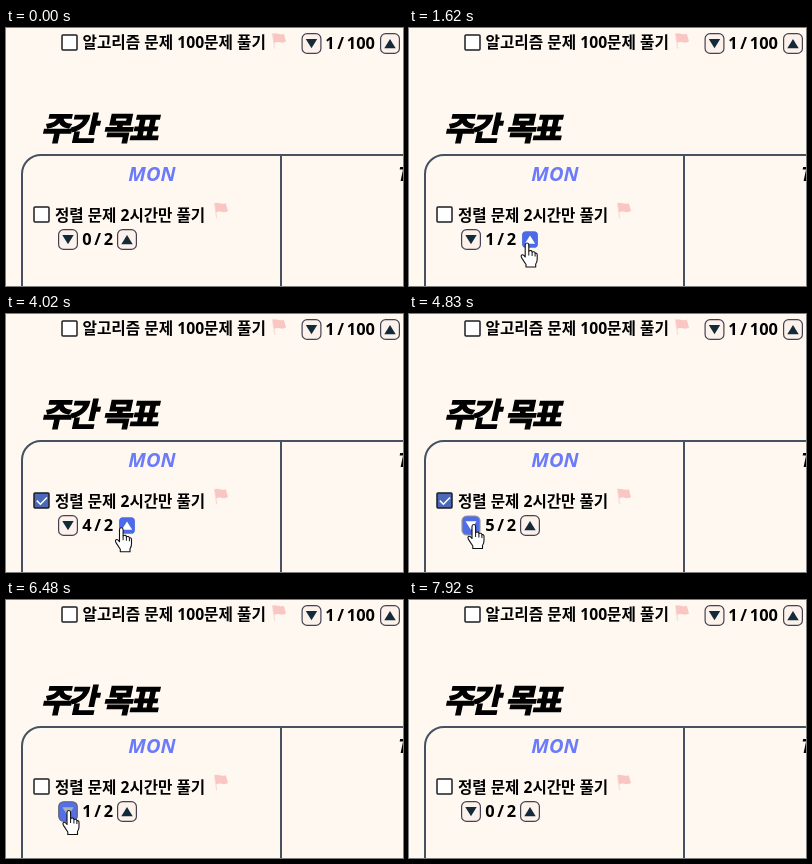
These frames come from a looping animation (397x258 px, 8340 ms). An HTML page:

```html
<!DOCTYPE html>
<html lang="ko">
<head>
<meta charset="utf-8">
<title>주간 목표</title>
<style>
  html, body { margin: 0; width: 100%; height: 100%; overflow: hidden; background: #fef8f0; }
  svg { display: block; width: 397px; height: 258px; }
  text { fill: #000; white-space: pre; }
  .ko { font-family: "Open Sans", "Noto Sans CJK KR", "Noto Sans CJK", sans-serif; font-weight: 700; }
  .num { font: 700 16.4px "Open Sans", "Noto Sans", sans-serif; word-spacing: -1.5px; }
  .day { font: italic 700 20px "Open Sans", "Noto Sans", sans-serif; }
  .title { font: 900 32px "Noto Sans CJK KR", "Noto Sans CJK", sans-serif; letter-spacing: -2.7px;
           word-spacing: 1.5px; stroke: #000; stroke-width: 1.4; }
  .box { fill: #fff; stroke: #1c1c22; stroke-width: 1.5; }
  .cursor { fill: #fff; stroke: #111; stroke-width: 1.1; stroke-linejoin: round; }
</style>
</head>
<body>
<svg viewBox="0 0 397 258">
  <defs>
    <g id="flag">
      <path d="M.6 1 2.6 15.6" stroke="#f8dcd4" stroke-width="1.3" stroke-linecap="round"/>
      <path d="M.8 1.4C4-.6 6.5 3 11.8 1.2L14 9C9.2 11.8 6.3 8 2.1 10.2Z" fill="#fac6c3"/>
    </g>
  </defs>
  <rect width="397" height="258" fill="#fef8f0"/>

  <rect class="box" x="56" y="7" width="15" height="15" rx="1"/>
  <text class="ko" x="76.5" y="20" font-size="15.7">알고리즘 문제 100문제 풀기</text>
  <use href="#flag" x="266" y="4.6"/>
  <text class="num" x="319.2" y="21">1 / 100</text>

  <text class="title" transform="translate(35 112) skewX(-12)">주간 목표</text>

  <g fill="none" stroke="#465162" stroke-width="2">
    <rect x="16" y="127" width="780" height="400" rx="19"/>
    <path d="M275 127V260"/>
  </g>
  <text class="day" x="122.3" y="153" style="fill:#6b7bfa">MON</text>
  <text class="day" x="392" y="153">TUE</text>

  <rect class="box" id="check" x="28" y="179" width="15" height="15" rx="1"/>
  <path id="tick" d="M30.8 186.6 34.4 190.2 41 183.4" fill="none" stroke="#fff" stroke-width="1.5"/>
  <text class="ko" x="49" y="192.5" font-size="15.6">정렬 문제 2시간만 풀기</text>
  <use href="#flag" x="208" y="174.1"/>
  <text class="num" id="count" x="76.2" y="217"></text>

  <g id="buttons"></g>
  <path class="cursor" id="arrow" d="M0 0V16.5L3.8 12.9 6.4 18.6 8.8 17.5 6.3 12H11.6Z"/>
  <g class="cursor" id="hand">
    <path d="M-1.8 2Q-1.8 0 0 0T1.8 2V8Q4.7 6.8 5.1 9 7.6 8 8.1 10.2 10.2 9.6 10.2 12V16Q10.2 19 8.7 21V24H-1V21.5L-5 15.4Q-6.6 12.8-5.2 12T-1.8 14Z"/>
    <path d="M1.8 8V12.5M5.1 9V13M8.1 10.2V13.5" fill="none" stroke-width="1"/>
  </g>
</svg>
<script>
const LOOP = 8340, STEP = 30;
const $ = id => document.getElementById(id);

// Pointer tip: time, x, y
const path = [
  [90, 380, 67], [300, 27, 280], [449, 100, 262], [700, 118, 215],
  [2550, 118, 215], [2700, 115.3, 214], [4250, 115.3, 213.7],
  [4500, 64.8, 210.5], [4900, 64.8, 210.5], [5200, 62.8, 210.5],
  [6720, 62.8, 210.5], [7440, 314, 78], [7920, 398, 43]
];

const up = {
  hover: [663, 4280],
  presses: [[900, 1050], [1380, 1830], [2550, 2700], [3240, 3420], [3840, 4080]]
};
const down = {
  hover: [4470, 6743],
  presses: [[4730, 4920], [5220, 5370], [5790, 5940], [6120, 6270], [6420, 6630]]
};

const CREAM = [254, 248, 240], FACE = [253, 242, 235], INK = [18, 42, 58], EDGE = [66, 66, 82];
const HOVER = [88, 116, 232], PRESSED = [76, 105, 232], WHITE = [255, 255, 255];

const clamp = v => Math.max(0, Math.min(1, v));
const mix = (a, b, k) => a.map((v, i) => v + (b[i] - v) * k);
const rgb = c => `rgb(${c.map(Math.round)})`;

function pulse(t, [from, to], rise, fall) {
  return t < to ? clamp((t - from) / rise) : clamp(1 - (t - to) / fall);
}

function addShape(tag, attrs, parent) {
  const el = document.createElementNS("http://www.w3.org/2000/svg", tag);
  for (const key in attrs) el.setAttribute(key, attrs[key]);
  return parent.appendChild(el);
}

function addButton(x, y, dir) {
  const place = addShape("g", { transform: `translate(${x + 10} ${y + 10.5})` }, $("buttons"));
  const body = addShape("g", {}, place);
  const face = addShape("rect", { x: -9.4, y: -9.9, width: 18.8, height: 19.8, rx: 5, "stroke-width": 1.2 }, body);
  const mark = addShape("path", { d: dir > 0 ? "M-5.7 4.8H5.7L0-4.4Z" : "M-5.7-4.4H5.7L0 4.8Z" }, body);
  return { body, face, mark };
}

// The mark brightens first; the outline and size follow.
function paint(button, hover, press) {
  const late = press * press;
  button.body.setAttribute("transform", `scale(${1 - .1 * late})`);
  button.face.setAttribute("fill", rgb(mix(mix(FACE, HOVER, hover), PRESSED, press)));
  button.face.setAttribute("stroke", rgb(mix(EDGE, CREAM, late)));
  button.mark.setAttribute("fill", rgb(mix(INK, WHITE, clamp(press * 1.6))));
}

paint(addButton(295.5, 5, -1), 0, 0);
paint(addButton(374, 5, 1), 0, 0);
down.button = addButton(52, 201, -1);
up.button = addButton(111, 201, 1);

function tip(t) {
  const i = path.findIndex(p => p[0] > t);
  if (i < 1) return null;
  const [t0, x0, y0] = path[i - 1], [t1, x1, y1] = path[i];
  const k = (t - t0) / (t1 - t0);
  return [x0 + (x1 - x0) * k, y0 + (y1 - y0) * k];
}

const clicks = (t, b) => b.presses.filter(p => t >= p[1]).length;
const inside = (t, b) => t >= b.hover[0] && t < b.hover[1];

function draw(t) {
  for (const b of [up, down]) {
    const press = Math.max(...b.presses.map(p => pulse(t, p, 150, 300)));
    paint(b.button, pulse(t, b.hover, 150, 150), press);
  }

  const count = clicks(t, up) - clicks(t, down);
  const done = count >= 2;
  $("count").textContent = `${count} / 2`;
  $("check").style.fill = done ? "#4b69b8" : "";
  $("tick").style.display = done ? "" : "none";

  const at = tip(t), pointing = inside(t, up) || inside(t, down);
  $("arrow").style.display = at && !pointing ? "" : "none";
  $("hand").style.display = at && pointing ? "" : "none";
  if (at) $(pointing ? "hand" : "arrow").setAttribute("transform", `translate(${at})`);
}

const start = performance.now();
function tick() {
  const t = (performance.now() - start) % LOOP;
  draw(Math.floor(t / STEP) * STEP);
  requestAnimationFrame(tick);
}
tick();
</script>
</body>
</html>
```
